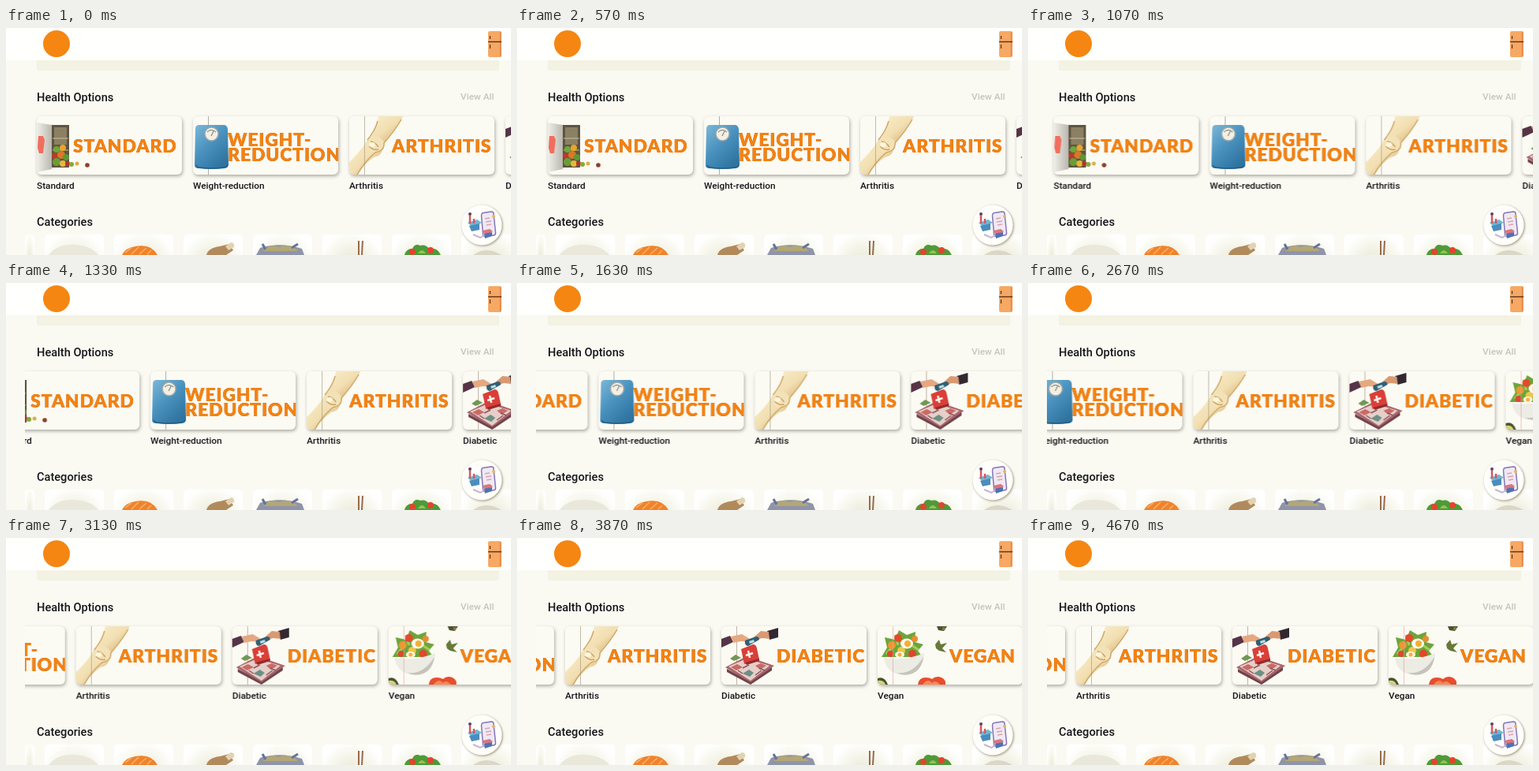
Write an HTML page that moves like this. It is 640 px wide and 288 px high and loops after 4.71 s.

```html
<!DOCTYPE html>
<html lang="en">
<head>
<meta charset="utf-8">
<title>Health options carousel</title>
<style>
html, body { margin: 0; width: 100%; height: 100%; overflow: hidden; background: #fafaf3; }
svg { display: block; width: 100%; height: 100%; }
text { font-family: Roboto, sans-serif; font-weight: 500; fill: #16161a; }
.head { font-size: 14.6px; }
.label { font-size: 11.8px; }
.more { font-size: 11.8px; fill: #c6c5bc; }
.title { font-family: Lato, sans-serif; font-weight: 900; fill: #f5820f; filter: drop-shadow(.7px .8px .2px #8f5424); }
.panel { fill: #fbfaf3; filter: drop-shadow(1px 2px 2px #77756b99); }
.fab { fill: #fffefa; filter: drop-shadow(1px 1.5px 1.5px #86795ccc); }
</style>
</head>
<body>
<svg viewBox="0 0 640 288" preserveAspectRatio="none">
  <defs>
    <linearGradient id="scale" x2=".7" y2="1"><stop stop-color="#7db9d8"/><stop offset=".5" stop-color="#4a92bf"/><stop offset="1" stop-color="#2f739f"/></linearGradient>
    <linearGradient id="skin" x2="1" y2="1"><stop stop-color="#faeecb"/><stop offset=".5" stop-color="#f2dfb2"/><stop offset="1" stop-color="#d0a765"/></linearGradient>
    <linearGradient id="door" x2="1"><stop stop-color="#f0efe8"/><stop offset="1" stop-color="#b9b7ae"/></linearGradient>
    <radialGradient id="tile" r=".62"><stop offset=".3" stop-color="#efeee0"/><stop offset=".62" stop-color="#f8f8ef"/><stop offset=".9" stop-color="#fff"/></radialGradient>
    <clipPath id="card"><rect width="184" height="74" rx="6"/></clipPath>
    <clipPath id="view"><rect x="24" y="96" width="616" height="130"/></clipPath>
  </defs>

  <rect width="640" height="288" fill="#fafaf3"/>
  <rect width="640" height="41" fill="#fffffd"/>
  <path d="M39 41H625V51q0 3-3 3H42q-3 0-3-3Z" fill="#f3f2e3"/>
  <circle cx="64" cy="20" r="17" fill="#f58612"/>

  <g>
    <rect x="611" y="4" width="17" height="33" rx="2" fill="#f7a863"/>
    <path d="M626.500 5v31" stroke="#dc8a4d" stroke-width="1.500"/>
    <path d="M611 17.500h17" stroke="#543320" stroke-width="1.400"/>
    <path d="M613.500 10v4M613.500 21v5" stroke="#543320" stroke-width="1.200"/>
  </g>

  <text class="head" x="39" y="93">Health Options</text>
  <text class="more" x="576" y="91">View All</text>
  <g clip-path="url(#view)"><g id="track"></g></g>
  <text class="head" x="39" y="251">Categories</text>
  <g id="tiles"></g>

  <g>
    <path d="M54 288q10-13 29-13 24 0 34 13Z" fill="#e9e8db"/>
    <path d="M147 288q4-9 17-11 20-4 28 11Z" fill="#f0832a"/>
    <path d="M151 285l8-6m0 8l9-9m1 9l9-8m1 8l5-5" stroke="#fbb06c" stroke-width="1.500"/>
    <path d="M254 288q2-9 17-11l12-3 5 8-9 6Z" fill="#b18a5c"/>
    <path d="M278 277l7-5q5 0 4 6l-7 4Z" fill="#e3d2b2"/>
    <path d="M317 288l5-9q26-8 53 1l3 8Z" fill="#8f94a8"/>
    <path d="M325 283q10-10 20-5 16-5 25 5Z" fill="#b4a775"/>
    <path d="M329 281l-4-7m37 5l8-5" stroke="#66739b" stroke-width="3"/>
    <path d="M447 270v18m5-18l-1 18" stroke="#986c4a" stroke-width="2"/>
    <path d="M505 288q2-8 10-8 3-7 10-4 7-2 11 4 11-2 15 8Z" fill="#4f9a38"/>
    <g fill="#e2452f"><circle cx="515" cy="284" r="4"/><circle cx="538" cy="282" r="4"/></g>
    <path d="M522 286q5-8 10 0" fill="#93c24f"/>
    <path d="M592 288q16-12 36 0Z" fill="#dad7c6"/>
  </g>

  <g>
    <circle class="fab" cx="603" cy="250" r="25.500"/>
    <path d="M605 234.500l10-1.500q3 0 3 3l2.500 24q0 3-3 3l-10 1.500q-3 0-3-3l-2-23q0-4 2.500-4Z" fill="#edeaf5" stroke="#8674b3" stroke-width="1.500"/>
    <path d="M607 242l6-1m-5 5l7-1m-6 5l6-1" stroke="#e3a0a6" stroke-width="1.500"/>
    <path d="M585 247l12-4 6 4-12 6Z" fill="#72b6d6"/>
    <path d="M587 251l13-3v8l-10 2Z" fill="#4a8dbd"/>
    <path d="M588 238v10m5-6v6" stroke="#d45862" stroke-width="2.500"/>
    <circle cx="588" cy="236" r="2" fill="#60405c"/>
    <path d="M604 257l9-2 4 3-10 5Z" fill="#e07478"/>
    <path d="M606 261l10-2v5l-9 3Z" fill="#4f72b4"/>
    <path d="M592 262l9 4 5-3" fill="none" stroke="#c8b3d2" stroke-width="2"/>
    <circle cx="618" cy="239" r="2" fill="#e9b263"/>
  </g>
</svg>

<script>
const LOOP = 4710, GAP = 198;
const $ = id => document.getElementById(id);
const dots = list => list.map(([x, y, r, c]) => `<circle cx="${x}" cy="${y}" r="${r}" fill="${c}"/>`).join('');

const art = {
  standard: `
    <path d="M19 11h22v54H19Z" fill="#5f5440"/>
    <path d="M22 14h16v22H22Z" fill="#8b8063"/>
    <path d="M20 28h20M20 43h20" stroke="#c9bf9c"/>
    <path d="M0 8l19 3v56L0 71Z" fill="url(#door)"/>
    <path d="M2 25h6l2 5-2 17H3L1 40Z" fill="#f06e60"/>
    ${dots([[25, 42, 4, '#6aaa35'], [33, 40, 4, '#e8a52c'], [23, 50, 4, '#b93a2b'], [31, 49, 5, '#d9782a'], [37, 52, 4, '#5b9832'],
      [25, 58, 5, '#6b9d36'], [33, 60, 4, '#e5b83b'], [39, 60, 3, '#b33228'], [44, 61, 3, '#87a93c'], [51, 60, 2.5, '#d8ae4b'], [64, 62, 2.8, '#8d3f2d']])}`,
  weight: `
    <path d="M19.500 0v74" stroke="#8f8d8a" stroke-width=".7"/>
    <path d="M8 11h31q4 0 5 5l1 45q0 4-5 5-17 2-33 0-5 0-5-4L3 16q0-5 5-5Z" fill="url(#scale)"/>
    <path d="M4 62q1 3 4 3 16 2 31 0 4 0 5-3" fill="none" stroke="#235f86" stroke-width="1.500"/>
    <circle cx="23.500" cy="22.500" r="8.500" fill="#f2f0e4" stroke="#a2a8a8" stroke-width="1.500"/>
    <path d="M18 20q5-5 11 0M23 25l3-6" fill="none" stroke="#6c6b60"/>`,
  arthritis: `
    <path d="M37 0h31q-7 16-24 34L24 32Q35 16 37 0Z" fill="url(#skin)"/>
    <path d="M0 74V58Q13 46 22 32l20 10q-1 8-11 10Q19 60 11 74Z" fill="url(#skin)"/>
    <path d="M22 31q4-6 12-6 12 4 10 13-3 9-14 8-14-2-8-15Z" fill="#f3e2b8"/>
    <path d="M66 4Q58 18 44 34q1 10-11 12Q19 58 10 74M36 6Q33 18 23 30" fill="none" stroke="#cfa866" stroke-width="1.500"/>
    <path d="M27 32q6 1 10 7M25 38q6 6 12 4" fill="none" stroke="#cfa463" stroke-width="1.500"/>
    <ellipse cx="29" cy="36" rx="4" ry="3" fill="#fff6df"/>
    <path d="M19.500 0v74" stroke="#99917a" stroke-width=".6"/>`,
  diabetic: `
    <path d="M19.500 0v74" stroke="#9a8578" stroke-width=".6"/>
    <path d="M0 16l11-4 4 8-15 7Z" fill="#563346"/>
    <path d="M12 13l14-3 10 6-2 4-9-1-10 2Z" fill="#e6a880"/>
    <path d="M58 6l14-4v12l-11 3Z" fill="#33282f"/>
    <path d="M60 7l-10-1-9 8 3 3 8-2 9 1Z" fill="#d99a72"/>
    <path d="M30 18l14-5q4 0 4 4l-14 8q-5 0-4-7Z" fill="#315f75"/>
    <path d="M35 19l6-2 1 3-6 2Z" fill="#b8e0e2"/>
    <path d="M5 52l27-14 35 12-30 23Z" fill="#a9666b"/>
    <path d="M9 51l23-10 29 9-24 19Z" fill="#e6cfc9"/>
    <path d="M7 54l30 17 27-19v4L37 74 7 58Z" fill="#70434b"/>
    <path d="M12 52l8-4 7 4-8 4Zm31-2l7-3 7 3-8 5Z" fill="#c96a66"/>
    <path d="M27 60l8-5 6 4-5 5Z" fill="#6d8f86"/>
    <path d="M16 44l-5-3 7-5 7 4Z" fill="#709854"/>
    <path d="M25 29l15-6q4 0 5 5l3 14-19 6Z" fill="#d93f38"/>
    <path d="M30 46l18-5v3l-16 5Z" fill="#922c2b"/>
    <path d="M34 31l2 9m-5-3l9-3" stroke="#fff5ee" stroke-width="2.500"/>
    <path d="M48 53l7 3m-34 0l6 4m16 2l8-6m-24-3l8-4" stroke="#8b5560" stroke-width="1.500"/>`,
  vegan: `
    <path d="M5 39l7-12-3-13 13 3 5-12 10 6 11-4-1 13 11 3-7 8 6 8Z" fill="#6ca53a"/>
    <path d="M11 35l8-9m3-15l4 13m26 6l-9-6" stroke="#a6cc59" stroke-width="3"/>
    ${dots([[18, 24, 5, '#ef9631'], [26, 15, 5, '#e44a2c'], [16, 35, 4, '#df4730'], [44, 35, 5, '#e3452c'], [47, 16, 4, '#e68e32'], [30, 31, 5, '#f0c54b']])}
    <ellipse cx="37" cy="22" rx="8" ry="6.500" fill="#fff8ee"/><circle cx="38" cy="22" r="4" fill="#f4af32"/>
    <ellipse cx="28" cy="36" rx="6" ry="4" fill="#fff5e6"/><circle cx="28" cy="36" r="2.500" fill="#f1b13a"/>
    <path d="M8 40q25 5 51-6 0 17-14 25-10 5-22 1Q10 55 8 40Z" fill="#ecebe4"/>
    <path d="M24 59q20 3 34-20-2 16-14 21-10 4-20-1Z" fill="#c6c4ba"/>
    <path d="M75 0h13l-4 6-7-1Z" fill="#485431"/><circle cx="84" cy="3" r="2" fill="#9a763e"/>
    <path d="M73 23l5-6 2 6 8-2-6 7 5 5-9-2-4-3Z" fill="#687938"/>
    <path d="M51 74q1-9 10-9 5 0 8 2 5-5 12-2 6 3 5 9Z" fill="#e84d2c"/>
    <path d="M57 74q7-9 12-2 4-5 10 2Z" fill="#f78a54"/>
    <path d="M0 66q9-3 13 8H0Z" fill="#45552d"/><path d="M0 69q8-1 10 5H0Z" fill="#dad17a"/>
    <path d="M19.500 0v74" stroke="#e3a2a2" stroke-width=".6"/>`
};

// name, drawing, then title lines as [text, x, baseline]
const cards = [
  ['Standard', 'standard', [['STANDARD', 46, 45.5]]],
  ['Weight-reduction', 'weight', [['WEIGHT-', 44, 37.5], ['REDUCTION', 44, 56.5]]],
  ['Arthritis', 'arthritis', [['ARTHRITIS', 54, 45.5]]],
  ['Diabetic', 'diabetic', [['DIABETIC', 70, 45.5]]],
  ['Vegan', 'vegan', [['VEGAN', 91, 45.5]]]
];

const title = ([word, x, y]) =>
  `<text class="title" x="${x}" y="${y}" font-size="23" letter-spacing=".8">${word}</text>`;

$('track').innerHTML = cards.map(([name, pic, lines], i) => `
  <g transform="translate(${39 + i * GAP} 112)">
    <rect class="panel" width="184" height="74" rx="6"/>
    <g clip-path="url(#card)">${art[pic]}${lines.map(title).join('')}</g>
    <text class="label" y="92">${name}</text>
  </g>`).join('');

$('tiles').innerHTML = Array.from({ length: 8 }, (_, i) => {
  const x = Math.max(24, 88 * i - 39), right = 88 * i + 36;
  return `<rect x="${x}" y="262" width="${right - x}" height="76" rx="5" fill="url(#tile)"/>`;
}).join('');

// time in ms, scroll position: two swipes that settle softly on a centred card
const steps = [[0, 0], [914, 0], [2104, 176], [2273, 176], [3523, 374], [LOOP, 374]];
$('track').animate(
  steps.map(([t, x]) => ({ offset: t / LOOP, transform: `translateX(${-x}px)`, easing: 'cubic-bezier(.42, 0, .45, 1)' })),
  { duration: LOOP, iterations: Infinity }
);
</script>
</body>
</html>
```
